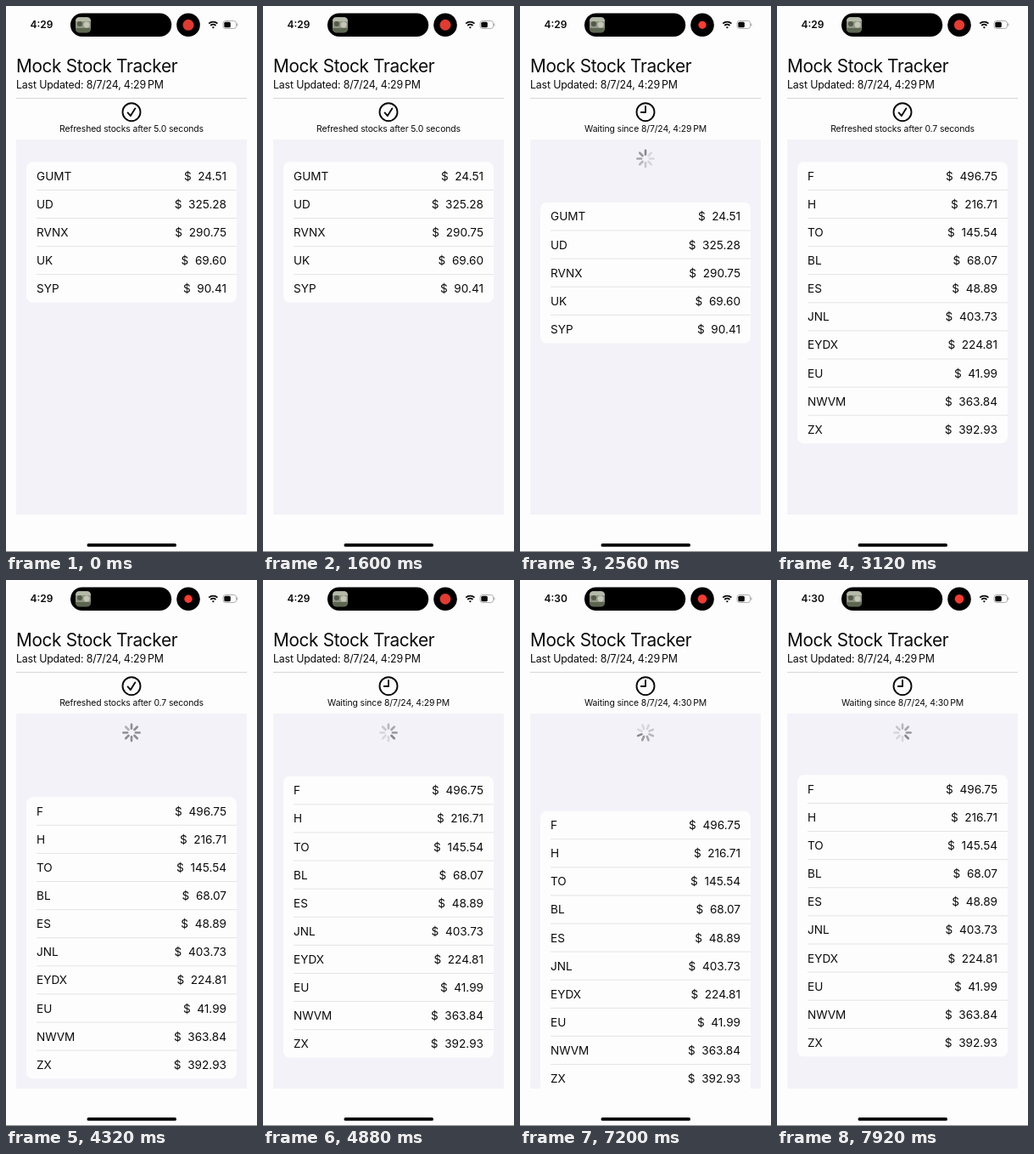
An HTML page that plays this animation: 296x642 px, repeating every 8000 ms.

```html
<!DOCTYPE html>
<html lang="en">
<head>
<meta charset="utf-8">
<title>Mock Stock Tracker</title>
<style>
  html, body { margin: 0; width: 100%; height: 100%; overflow: hidden; background: #fdfdfd; }
  svg { display: block; width: 296px; height: 642px; }
  text { font-family: Inter, Roboto, sans-serif; fill: #0b0b0c; }
  .clock { font-size: 12px; font-weight: 600; }
  .title { font-size: 20.8px; letter-spacing: -.35px; }
  .updated { font-size: 12.4px; letter-spacing: -.18px; }
  .caption { font-size: 10.4px; letter-spacing: -.11px; text-anchor: middle; }
  .row { font-size: 13.6px; }
  .price { text-anchor: end; }
  .icon { fill: none; stroke: #0b0b0c; stroke-width: 1.9; stroke-linecap: round; stroke-linejoin: round; }
  .error .icon { stroke: #d13b36; }
  .error text { fill: #d13b36; }
  .rule { stroke: #e4e4e6; }
  #spinner line { stroke: #838388; stroke-width: 2.6; stroke-linecap: round; }
</style>
</head>
<body>
<svg viewBox="0 0 296 642">
  <defs>
    <clipPath id="listClip"><rect x="12" y="155" width="272" height="443"/></clipPath>
    <clipPath id="thumbClip"><rect x="82" y="13.3" width="18" height="18" rx="4.5"/></clipPath>
  </defs>
  <rect width="296" height="642" fill="#fdfdfd"/>

  <text class="clock" id="clock" x="28.5" y="26.3"></text>
  <rect x="76" y="8.5" width="119.2" height="27.6" rx="13.8"/>
  <g clip-path="url(#thumbClip)">
    <rect x="82" y="13" width="18" height="19" fill="#8f9583"/>
    <rect x="82" y="13" width="18" height="5" fill="#b4b9a8"/>
    <circle cx="87" cy="21" r="3" fill="#525b48"/>
    <circle cx="95" cy="22" r="3.5" fill="#c3c5b6"/>
    <rect x="82" y="26" width="18" height="6" fill="#5d6650"/>
  </g>
  <circle cx="215" cy="22.3" r="13.8"/>
  <circle id="dot" cx="215" cy="22.3"/>
  <g fill="none" stroke="#0b0b0c" stroke-width="1.8">
    <path d="M239.2 20.6a7.4 7.4 0 0 1 10.2 0M241.2 23a4.5 4.5 0 0 1 6.2 0"/>
    <path d="M244.3 26.6l-1.5-1.7a2.2 2.2 0 0 1 3 0z" fill="#0b0b0c" stroke="none"/>
  </g>
  <rect x="256" y="17.5" width="15.5" height="9" rx="2.8" fill="none" stroke="#a5a5a8" stroke-width=".9"/>
  <rect x="257.3" y="18.8" width="7.5" height="6.4" rx="1.5" fill="#0b0b0c"/>
  <path d="M272.8 20.6v2.8" stroke="#a5a5a8" stroke-width="1.1"/>

  <text class="title" x="12" y="78">Mock Stock Tracker</text>
  <text class="updated" x="12" y="97.3">Last Updated: 8/7/24, 4:29&#8201;PM</text>
  <path d="M12 108.5h272" stroke="#d6d6d9"/>

  <g id="done">
    <path class="icon" d="M137.5 124.7a10.5 10.5 0 1 0 21 0a10.5 10.5 0 1 0-21 0M143.6 125.4l3.2 3.8l5.5-8.6"/>
    <text class="caption" id="doneText" x="148" y="147.8"></text>
  </g>
  <g id="waiting">
    <path class="icon" d="M137.5 124.7a10.5 10.5 0 1 0 21 0a10.5 10.5 0 1 0-21 0M148 118v7h-5.2"/>
    <text class="caption" id="waitingText" x="148" y="147.8"></text>
  </g>
  <g id="error" class="error">
    <path class="icon" d="M146.4 114.4a1.9 1.9 0 0 1 3.2 0l9.2 16a1.9 1.9 0 0 1-1.6 2.8h-18.4a1.9 1.9 0 0 1-1.6-2.8zM148 119.8v5.6M148 129.2v.1"/>
    <text class="caption" x="148" y="145.6">Error: Failed to get stocks</text>
  </g>

  <g clip-path="url(#listClip)">
    <g id="list">
      <rect x="12" width="272" height="443" fill="#f3f2f8"/>
      <g id="spinner"></g>
      <g id="content">
        <rect id="card" x="24" width="248" rx="7.5" fill="#fdfdfd"/>
        <g id="oldRows"></g>
        <g id="newRows"></g>
      </g>
    </g>
  </g>
  <rect x="95.5" y="632" width="105.5" height="3.8" rx="1.9"/>
  <path d="M0 641.5h296" stroke="#8f8f91"/>
</svg>
<script>
const LOOP = 8000, STEP = 80, ROW = 33.1, PEAK = 88.3, REST = 46;
const PULL_MS = 260, SETTLE_MS = 113, CLOSE_MS = 330, TRIGGER_MS = 228;
const MINUTE_AT = 6240, PULSE_MS = 1680;

const oldStocks = 'GUMT 24.51,UD 325.28,RVNX 290.75,UK 69.60,SYP 90.41';
const newStocks = 'F 496.75,H 216.71,TO 145.54,BL 68.07,ES 48.89,' +
  'JNL 403.73,EYDX 224.81,EU 41.99,NWVM 363.84,ZX 392.93';

// Each pull to refresh: finger down, finger up, answer received.
const pulls = [
  { start: 1620, release: 2190, end: 2565 },
  { start: 4172, release: 4500, end: 4890 },
  { start: 6880, release: 7200, end: Infinity }
];

const $ = id => document.getElementById(id);
const clamp = x => Math.min(1, Math.max(0, x));
const show = (id, on) => $(id).setAttribute('visibility', on ? 'visible' : 'hidden');

function buildRows(id, stocks) {
  const list = stocks.split(',');
  $(id).innerHTML = list.map((stock, i) => {
    const [name, price] = stock.split(' ');
    const y = i * ROW;
    const rule = i < list.length - 1 ? `<path class="rule" d="M36 ${y + ROW}H272"/>` : '';
    return `<text class="row" x="36" y="${y + 21.6}">${name}</text>` +
      `<text class="row price" x="260" y="${y + 21.6}">$\u00a0\u00a0${price}</text>${rule}`;
  }).join('');
}

buildRows('oldRows', oldStocks);
buildRows('newRows', newStocks);
$('spinner').innerHTML = Array.from({ length: 8 }, (_, i) =>
  `<line y1="-4.9" y2="-9.6" transform="rotate(${i * 45})"/>`).join('');
const spokes = [...$('spinner').children];

function heldOffset(pull, t) {
  if (t < pull.release) return PEAK * (1 - (1 - clamp((t - pull.start) / PULL_MS)) ** 2);
  return REST + (PEAK - REST) * Math.exp((pull.release - t) / SETTLE_MS);
}

function listOffset(pull, t) {
  if (!pull) return 0;
  if (t < pull.end) return heldOffset(pull, t);
  return heldOffset(pull, pull.end) * (1 - clamp((t - pull.end) / CLOSE_MS)) ** 2;
}

function drawSpinner(pull, t, offset, refreshing) {
  const closing = pull && t >= pull.end;
  const scale = closing ? 1 - clamp((t - pull.end) / 250) : 1;
  // The wheel turns by one spoke as the refresh begins.
  const turn = refreshing ? 45 * clamp((t - pull.start - TRIGGER_MS) / 180) : 0;
  const head = Math.floor(t / 125) + 4 - Math.floor(turn / 45);
  const filled = clamp((offset - 18) / 62) * 8;
  show('spinner', pull && scale > 0);
  $('spinner').setAttribute('transform', `translate(148 22.5) scale(${scale}) rotate(${turn})`);
  spokes.forEach((spoke, i) => {
    const lag = (head - i + 64) % 8;
    const alpha = refreshing || closing ? Math.max(.24, .95 - lag * .14) : .9 * clamp(filled - i * .9);
    spoke.setAttribute('opacity', alpha * (closing ? scale : 1));
  });
}

function render(t) {
  const pull = pulls.filter(p => t >= p.start).pop();
  const refreshing = pull && t >= pull.start + TRIGGER_MS && t < pull.end;
  const failed = !refreshing && t >= pulls[1].end;
  const updated = t >= pulls[0].end;
  const minute = t >= MINUTE_AT ? '4:30' : '4:29';
  const offset = listOffset(pull, t);

  $('clock').textContent = minute;
  show('done', !refreshing && !failed);
  show('waiting', refreshing);
  show('error', failed);
  $('doneText').textContent = `Refreshed stocks after ${updated ? '0.7' : '5.0'} seconds`;
  $('waitingText').textContent = `Waiting since 8/7/24, ${minute}\u2009PM`;

  const swap = clamp((t - pulls[0].end) / 200);
  $('list').setAttribute('transform', `translate(0 ${failed ? 155 : 157})`);
  $('content').setAttribute('transform', `translate(0 ${26.3 + offset})`);
  $('card').setAttribute('height', ROW * (5 + 5 * swap));
  $('oldRows').setAttribute('opacity', 1 - swap);
  $('newRows').setAttribute('opacity', swap);
  drawSpinner(pull, t, offset, refreshing);

  // The recording light dims as it swells.
  const pulse = (1 + Math.cos(t / PULSE_MS * 2 * Math.PI)) / 2;
  $('dot').setAttribute('r', 4.6 + 1.9 * pulse);
  $('dot').setAttribute('fill', `rgb(${255 - 32 * pulse},59,48)`);
}

function tick() {
  render(Math.floor(performance.now() % LOOP / STEP) * STEP);
  requestAnimationFrame(tick);
}
tick();
</script>
</body>
</html>
```
